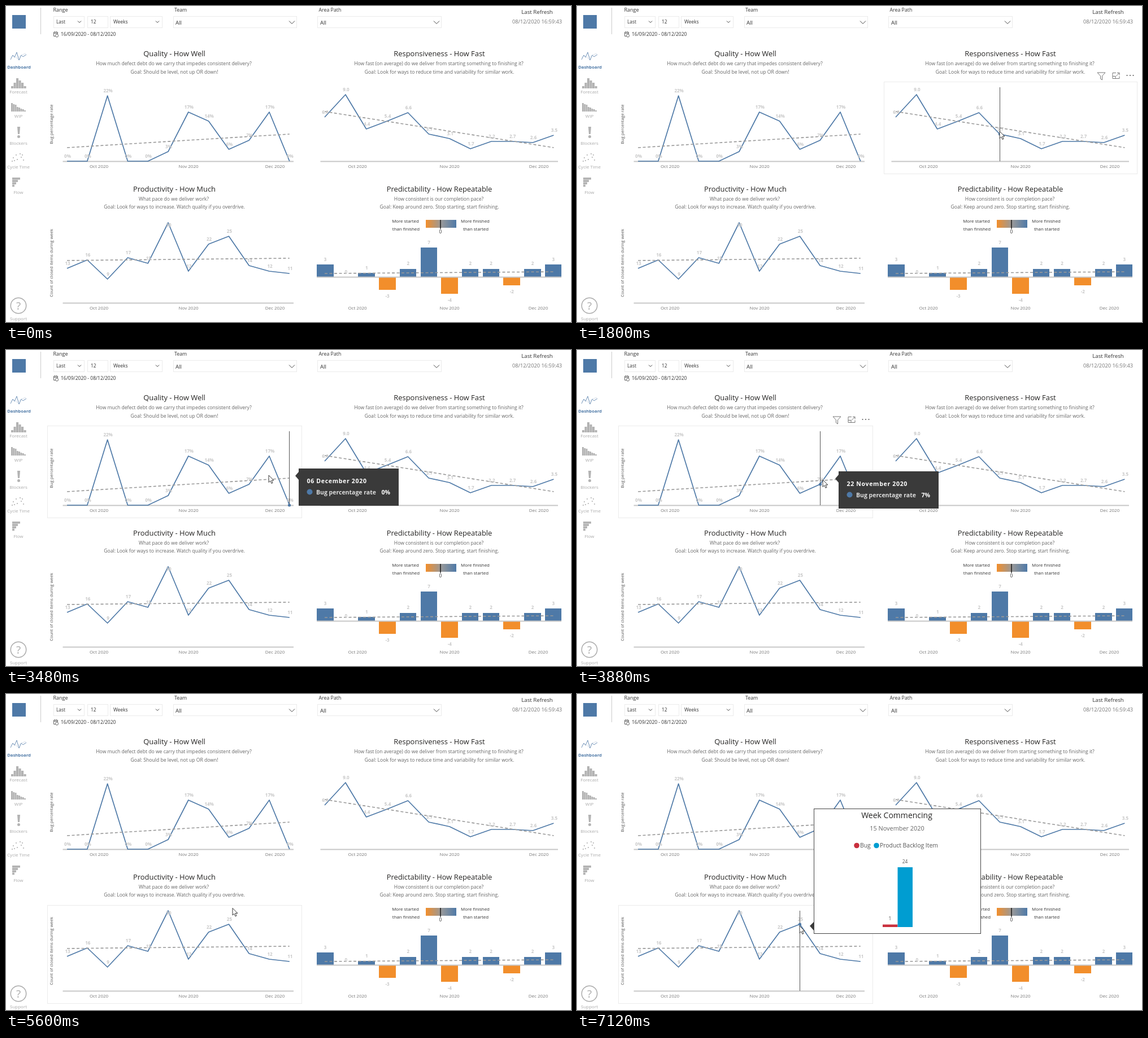
An HTML page for the animation above (8 s loop, 1000x560 px).

```html
<!DOCTYPE html>
<html lang="en">
<head>
<meta charset="utf-8">
<title>Team dashboard</title>
<style>
  html, body { margin: 0; width: 100%; height: 100%; overflow: hidden; background: #fff; }
  svg { display: block; width: 100%; height: 100%; }
  text { font-family: "Open Sans", "Noto Sans", sans-serif; white-space: pre; }
  .blurred { filter: blur(2px); }
</style>
</head>
<body>
<svg viewBox="0 0 1000 560">
  <defs>
    <linearGradient id="scale">
      <stop offset="0" stop-color="#f28e2b"/>
      <stop offset=".5" stop-color="#999"/>
      <stop offset="1" stop-color="#4e79a7"/>
    </linearGradient>
  </defs>
  <g id="page"></g>
  <g id="overlay"></g>
</svg>
<script>
const BLUE = '#4e79a7', ORANGE = '#f28e2b', GRAY = '#b3b3b3', DARK = '#3a3a3a';
const LOOP = 8000;

// y is the middle of the capitals
const text = (s, x, y, size, fill = '#333', anchor = 'start', extra = '') =>
  `<text x="${x}" y="${y + size * 0.357}" font-size="${size}" fill="${fill}" text-anchor="${anchor}" ${extra}>${s}</text>`;
const mid = (s, x, y, size, fill, extra) => text(s, x, y, size, fill, 'middle', extra);
const rect = (x, y, w, h, fill, extra = '') =>
  `<rect x="${x}" y="${y}" width="${w}" height="${h}" fill="${fill}" ${extra}/>`;
const path = (d, stroke, width = 1, fill = 'none', extra = '') =>
  `<path d="${d}" stroke="${stroke}" stroke-width="${width}" fill="${fill}" ${extra}/>`;
const dot = (x, y, r, fill) => `<circle cx="${x}" cy="${y}" r="${r}" fill="${fill}"/>`;
const frame = (x, y, w, h, stroke) => rect(x + .5, y + .5, w, h, 'none', `stroke="${stroke}"`);
const chevron = (x, y, r) => path(`M${x - r} ${y - r / 2}l${r} ${r}l${r} ${-r}`, '#444');
const trend = (x1, y1, x2, y2) =>
  path(`M${x1} ${y1}L${x2} ${y2}`, '#999', 1.6, 'none', 'stroke-dasharray="5 3.5"');
const dataLabel = (s, x, y) => mid(s, x, y, 8, '#c8c8c8', 'font-weight="700"');

function heading(x, y, title, question, goal) {
  return mid(title, x, y, 12.9, '#252423') + mid(question, x - 1, y + 17.5, 8.6, '#666')
    + mid(goal, x, y + 32, 8.6, '#666');
}

function months(y, ...xs) {
  return ['Oct 2020', 'Nov 2020', 'Dec 2020'].map((m, i) => mid(m, xs[i], y, 8, '#777')).join('');
}

function lineChart(x0, step, ys, labels, axisY, axisEnd, trendYs) {
  const xs = ys.map((_, i) => x0 + step * i);
  return path(`M${x0 - 7.5} ${axisY}H${axisEnd}`, '#c8c8c8', 2.2)
    + path('M' + xs.map((x, i) => `${x} ${ys[i]}`).join('L'), BLUE, 1.7, 'none', 'stroke-linejoin="round"')
    + trend(x0, trendYs[0], xs[11], trendYs[1])
    + labels.map((s, i) => dataLabel(s, xs[i] + 1, Math.max(ys[i] - 9, axisY < 400 ? 0 : 388))).join('');
}

function header() {
  return rect(11, 16, 24, 24, BLUE)
    + path('M61.5 3V50', '#ccc')
    + text('Range', 83.5, 6.5, 9) + text('Team', 298, 6.5, 8.8) + text('Area Path', 553.5, 6.5, 8.8)
    + [[84, 54], [144, 36], [184, 92], [296, 218], [551, 219]]
        .map(([x, w]) => frame(x, 18, w, 20, '#ebebeb')).join('')
    + text('Last', 89, 28.5, 8.4) + text('12', 150, 28.5, 8.4) + text('Weeks', 190, 28.5, 8.4)
    + text('All', 300, 29.5, 9.6) + text('All', 556, 29.5, 9.6)
    + chevron(130, 28, 3) + chevron(268, 28, 3) + chevron(506, 29, 5) + chevron(762, 29, 5)
    + path('M84.5 46.5h7v3M84.5 46.5v7h3M84.5 48.5h7M86.5 45v2M89.5 45v2', '#666')
    + `<circle cx="90" cy="52.5" r="2.6" fill="none" stroke="#666"/>`
    + text('16/09/2020 - 08/12/2020', 97, 49.5, 8.5)
    + mid('Last Refresh', 940, 10.5, 9.7) + mid('08/12/2020 16:59:43', 940, 28, 9.25, '#777');
}

function navigation() {
  const bars = (x, base, w, heights) =>
    heights.map((h, i) => rect(x + i * w, base - h, w - .4, h, GRAY)).join('');
  const labels = [['Forecast', 152], ['WIP', 195], ['Blockers', 243], ['Cycle Time', 285], ['Flow', 330], ['Support', 554]];
  const specks = [[11, 275], [13, 269], [18, 264], [20, 272], [25, 262], [27, 268], [31, 273], [15, 274], [29, 264]];
  return path('M8 95l4-8 3 4 4-9 4 14 4-9 3 3 6-4', BLUE, .8)
    + path('M8 91l6-3 6 5 7-6 8-3', '#b9c8da', .6)
    + mid('Dashboard', 23, 108.5, 7.7, BLUE, 'font-weight="700"')
    + bars(9, 146, 4.5, [4, 10, 18, 14, 10, 4])
    + bars(9, 187, 3.3, [15, 13, 12, 8, 7, 5, 4, 2])
    + path('M20 214h5l-1 13h-3z', 'none', 0, GRAY) + dot(22.5, 231.5, 2.5, GRAY)
    + specks.map(([x, y]) => dot(x, y, 1.1, GRAY)).join('')
    + [14, 10, 7, 4].map((w, i) => rect(11, 304 + i * 4.2, w, 3.7, GRAY)).join('')
    + `<circle cx="22" cy="531" r="13.7" fill="none" stroke="#aaa" stroke-width="1.5"/>`
    + mid('?', 22, 531, 19, '#aaa')
    + labels.map(([s, y]) => mid(s, 22, y, 8, '#aaa')).join('');
}

function barChart() {
  const values = [3, 0, 1, -3, 2, 7, -4, 2, 2, -2, 2, 3], unit = 7.45, base = 480.5;
  const x = i => 550 + 36.7 * i;
  return values.map((v, i) => rect(x(i), base - Math.max(v, 0) * unit, 29.5, Math.abs(v) * unit,
      v < 0 ? ORANGE : BLUE, 'shape-rendering="crispEdges"')).join('')
    + path('M550 480.5H983', '#c8c8c8', 2)
    + trend(564, 474, 969, 471)
    + values.map((v, i) => dataLabel(v, x(i) + 15, base - v * unit + (v < 0 ? 11 : -9))).join('');
}

function gradientLegend() {
  return rect(743, 379, 54, 14, 'url(#scale)') + path('M769 379V395', '#111', 1.4)
    + mid('0', 769, 400.5, 8.4)
    + mid('More started', 707, 381, 7.9) + mid('than finished', 708, 395.5, 7.9)
    + mid('More finished', 830.5, 381, 7.9) + mid('than started', 831.5, 395.5, 7.9);
}

document.getElementById('page').innerHTML = header() + navigation()
  + heading(298, 84.5, 'Quality - How Well',
      'How much defect debt do we carry that impedes consistent delivery?', 'Goal: Should be level, not up OR down!')
  + heading(767, 84.5, 'Responsiveness - How Fast',
      'How fast (on average) do we deliver from starting something to finishing it?',
      'Goal: Look for ways to reduce time and variability for similar work.')
  + heading(298, 324, 'Productivity - How Much', 'What pace do we deliver work?',
      'Goal: Look for ways to increase. Watch quality if you overdrive.')
  + heading(767, 324, 'Predictability - How Repeatable', 'How consistent is our completion pace?',
      'Goal: Keep around zero. Stop starting, start finishing.')
  + lineChart(108, 35.8, [275, 275, 159, 275, 275, 258, 188, 204, 254, 238, 188, 275],
      ['0%', '0%', '22%', '0%', '0%', '3%', '17%', '14%', '6%', '7%', '17%', '0%'], 275.5, 509, [251, 227])
  + lineChart(564, 36.85, [197, 157, 218, 204, 189, 227, 235, 253, 240, 240, 242, 229],
      ['6.0', '9.0', '4.4', '5.4', '6.6', '3.7', '3.1', '1.7', '2.2', '2.7', '2.6', '3.5'], 275.5, 977, [187, 251])
  + lineChart(108, 35.8, [465, 450, 484, 446, 456, 384, 470, 422, 408, 460, 470, 474],
      [13, 16, 9, 17, 15, 30, 12, 22, 25, 14, 12, 11], 526.5, 509, [451, 447])
  + mid('Bug percentage rate', 80.5, 209.5, 7.5, '#555', 'transform="rotate(-90 80.5 209.5)"')
  + mid('Count of closed items during week', 80.5, 455.5, 7.5, '#555', 'transform="rotate(-90 80.5 455.5)"')
  + months(284, 164.5, 323, 476) + months(284, 622, 785, 943)
  + months(535.5, 164.5, 323, 476) + months(535.5, 622, 785, 942)
  + barChart() + gradientLegend();

function hoverFrame(x, y, w, h, icons) {
  const r = x + w, iy = y - 10;
  return frame(x, y, w, h, '#ebebeb') + (icons
    ? path(`M${r - 70} ${iy - 6}h14l-5.5 6v7l-3-2v-5z`, '#777')
      + path(`M${r - 37} ${iy - 5.5}h-6v10h12v-4M${r - 35} ${iy - 5.5}h4v4M${r - 31} ${iy - 5.5}l-6 6M${r - 43} ${iy + .5}h5v4`, '#777')
      + [-5.5, 0, 5.5].map(d => dot(r - 12 + d, iy - 1, 1, '#555')).join('')
    : '');
}

const crosshair = (x, top, bottom, y) => path(`M${x} ${top}V${bottom}`, '#555') + dot(x, y, 2.6, BLUE);

function tooltip(x, y, w, date, name, value, pointsRight) {
  const edge = pointsRight ? x + w : x, tip = pointsRight ? 8 : -6;
  const bold = 'font-weight="700"';
  return rect(x, y, w, 66, DARK)
    + path(`M${edge} ${y + 6}l${tip} 7l${-tip} 7z`, 'none', 0, DARK)
    + text(date, x + 14.5, y + 22.5, 10.5, '#fff', 'start', bold + ' letter-spacing=".7"')
    + dot(x + 19.5, y + 41.5, 5, BLUE)
    + text(name, x + 31, y + 42, 10.5, '#ddd', 'start', bold)
    + text(value, x + w - 15, y + 42, 10.5, '#fff', 'end', bold);
}

function reportTooltip(t) {
  const moved = t >= 6760, x = moved ? 419 : 421, y = moved ? 203 : 200;
  let s = path(`M${x} ${y + 201}l-7 7l7 8z`, 'none', 0, DARK)
    + rect(x + .5, y + .5, 295, 221, '#fff', 'stroke="#444"');
  const titleY = moved ? y + 12 : y + 13;
  if (t < 6920) {
    const a = (t - 6280) / 1000 * 2 * Math.PI + 1.19;
    const dx = 5.4 * Math.cos(a), dy = 5.4 * Math.sin(a), cx = x + 76, cy = y + 85;
    s += dot(cx + dx, cy + dy, 1.3, '#333') + dot(cx - dx, cy - dy, 1.3, '#333')
      + text('Loading report page tooltip', x + 89.5, y + 82.5, 10.5, '#bbb');
    if (t >= 6200) {
      s += mid('Week Commencing', x + 147, titleY, 14, '#666', 'class="blurred"')
        + `<g class="blurred">${[[7, 8], [10, 15], [22, 54], [25, 62]]
            .map(([u, v]) => dot(x + u, y + v, 2.5, '#ccc')).join('')}</g>`;
    }
    return s;
  }
  s += mid('Week Commencing', 566, 215, 14, '#252423');
  if (t < 7000) return s;
  const grow = Math.min(1, (t - 6960) / 160);
  s += mid('15 November 2020', 566.5, 238, 10.9, '#666')
    + dot(495, 268.5, 4.8, '#c9303e') + text('Bug', 501, 268.5, 10.4, '#555')
    + dot(530, 268.5, 4.8, '#009dd1') + text('Product Backlog Item', 536, 268.5, 10.4, '#555')
    + rect(541, 413 - 4.5 * grow, 26.5, 4.5 * grow, '#c9303e')
    + rect(567.5, 413 - 106 * grow, 26.5, 106 * grow, '#009dd1');
  if (grow === 1) s += mid('1', 554, 398.5, 8.4, '#555') + mid('24', 580.5, 297, 8.4, '#555');
  return s;
}

const cursorTrack = [
  [1400, 720, 560], [1560, 738, 330], [1720, 748, 222], [3080, 748, 222], [3160, 680, 222],
  [3280, 523, 222], [3480, 465, 222], [3640, 435, 230], [5080, 435, 230],
  [5240, 428, 255], [5560, 402, 375], [5880, 394, 411], [LOOP, 394, 411]];

function cursor(t) {
  if (t < 1400) return '';
  const i = cursorTrack.findIndex(k => k[0] > t);
  const [t0, x0, y0] = cursorTrack[i - 1], [t1, x1, y1] = cursorTrack[i];
  const p = (t - t0) / (t1 - t0), x = x0 + (x1 - x0) * p, y = y0 + (y1 - y0) * p;
  return path(`M${x} ${y}v12.5l2.9-2.6l2 4.5l2.1-.9l-2-4.5h3.9z`, '#222', .9, '#fff');
}

function overlay(t) {
  const during = (a, b) => t >= a && t < b;
  let s = '';
  if (during(1640, 3320)) s += hoverFrame(543, 134, 448, 163, t >= 1720) + crosshair(748.5, 144, 275, 227);
  if (during(3320, 5400)) s += hoverFrame(73, 134, 450, 163, t >= 3640);
  if (during(3320, 3640)) s += crosshair(501.5, 144, 275, 275);
  if (during(3640, 5320)) s += crosshair(430.5, 144, 275, 238);
  if (t >= 5560) s += hoverFrame(73, 374, 450, 174, t >= 5720);
  if (t >= 5640) s += crosshair(394.5, 384, 526, 408);

  if (during(2560, 3320)) s += tooltip(462, 210, 264, '25 October 2020', 'Average Cycle Time (Calendar Days)', '3.70', true);
  if (during(3320, 3800)) s += tooltip(518, 210, 177, '06 December 2020', 'Bug percentage rate', '0%');
  if (during(3800, 5240)) s += tooltip(463, 215, 177, '22 November 2020', 'Bug percentage rate', '7%');
  if (t >= 5960) s += reportTooltip(t);
  return s + cursor(t);
}

const layer = document.getElementById('overlay');
const start = performance.now();
let shown = -1;
function tick() {
  // the picture advances in 40 ms steps
  const t = Math.floor((performance.now() - start) % LOOP / 40) * 40;
  if (t !== shown) layer.innerHTML = overlay(shown = t);
  requestAnimationFrame(tick);
}
tick();
</script>
</body>
</html>
```
